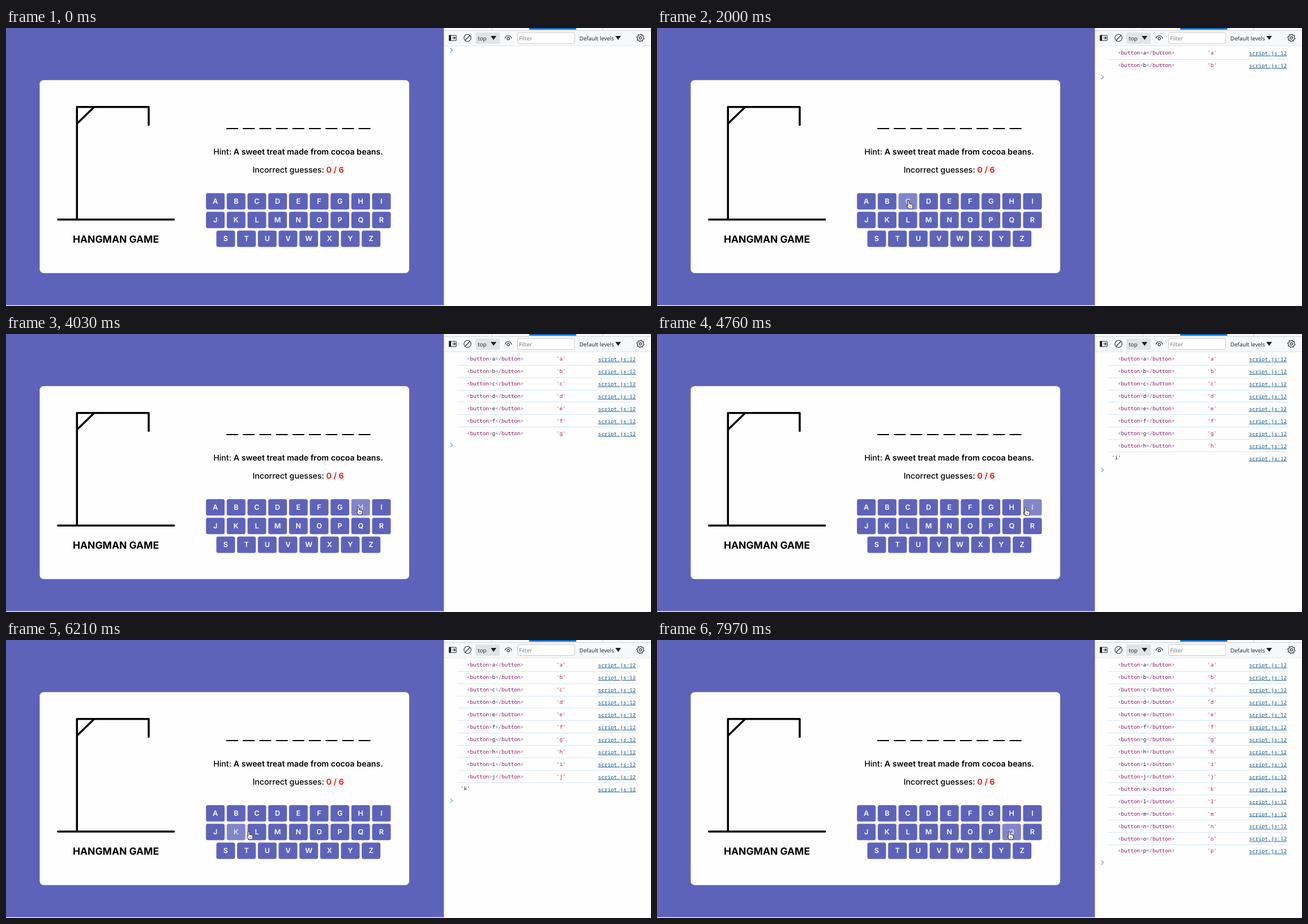
These frames come from a looping animation (1139 by 492 pixels, 8000 ms). An HTML page:

```html
<!DOCTYPE html>
<html lang="en">
<head>
<meta charset="utf-8">
<title>Hangman</title>
<style>
  html, body { margin: 0; width: 100%; height: 100%; overflow: hidden; background: #fff; }
  svg { display: block; width: 100vw; height: 100vh; text-rendering: geometricPrecision; }
  text { white-space: pre; }
  .game { font-family: Inter, sans-serif; font-size: 14.2px; font-weight: 500; text-anchor: middle; }
  .bold { font-weight: 600; }
  .red { font-weight: 600; fill: #f00c00; }
  .title { font-size: 17.5px; font-weight: 700; }
  .key rect { fill: #5e63ba; }
  .key text { fill: #fff; font-size: 12.6px; font-weight: 600; }
  .key.hover rect { fill: #8286c9; }
  .key.hover text { fill-opacity: .75; }
  .gallows { fill: none; stroke: #000; stroke-width: 3.5; stroke-linecap: round; stroke-linejoin: round; }
  .ui { font: 9.8px "Open Sans", sans-serif; fill: #1f1f1f; }
  .icon { fill: none; stroke: #2b2b2b; stroke-width: 1.1; }
  .log { font: 9.25px "Noto Sans Mono", monospace; fill: #222; }
  .tag { fill: #881260; }
  .mark { fill: #855c9c; }
  .str { fill: #a3244f; }
  .link { fill: #0f548c; text-decoration: underline; }
</style>
</head>
<body>
<svg viewBox="0 0 1139 492" preserveAspectRatio="none">
  <rect width="773" height="490.7" fill="#5e63ba"/>
  <rect x="59.5" y="92.2" width="652.5" height="341.5" rx="7" fill="#fefefe"/>
  <path class="gallows" d="M91.8 339H296.7M125.3 339V139.8H252V171.5M126 168.8L155 140.5"/>
  <path id="blanks" stroke="#000" stroke-width="2"/>
  <g class="game">
    <text class="title" x="194" y="380.3">HANGMAN GAME</text>
    <text x="516" y="224.3">Hint: <tspan class="bold">A sweet treat made from cocoa beans.</tspan></text>
    <text x="516" y="256.3">Incorrect guesses: <tspan class="red">0 / 6</tspan></text>
    <g id="keys"></g>
  </g>

  <rect x="773" width="366" height="492" fill="#fefefe"/>
  <rect x="773" width="366" height="31" fill="#f7f8f9"/>
  <path d="M773.5 0V492M857.5 0V4M1053.5 0V4M773 4.5H1139" stroke="#d2d4d8" fill="none"/>
  <path d="M774 31.5H1139" stroke="#dfe7f4"/>
  <rect x="924" width="83" height="3" fill="#146ecd"/>
  <g class="ui">
    <rect x="829" y="8" width="43" height="20" rx="2" fill="#e2e3e4"/>
    <rect x="903.5" y="8" width="100.5" height="19.5" rx="3" fill="#fff" stroke="#c8c8c8"/>
    <text x="833" y="21.5">top</text>
    <text x="906" y="21.5" fill="#757575">Filter</text>
    <text x="1012.5" y="21.5">Default levels</text>
    <path d="M856 14h10l-5 7zM1076 14h10l-5 7z"/>
    <path d="M782 12.5h4v10h-4z"/>
    <path class="icon" d="M788 17.5h5M790.7 15l2.6 2.5-2.6 2.5"/>
    <rect class="icon" x="782.5" y="13" width="12.5" height="9.3" rx="1"/>
    <circle class="icon" cx="815" cy="17.5" r="6.3"/>
    <path class="icon" d="M810.6 22L819.4 13"/>
    <path class="icon" d="M881 18.5q1.5-4.7 6-4.7t6 4.7"/>
    <circle class="icon" cx="887" cy="18.7" r="2.2"/>
    <circle class="icon" cx="1120.3" cy="17.5" r="2.1"/>
    <path id="gear" class="icon" stroke-linejoin="round"/>
  </g>
  <g id="rows" class="log"></g>
  <path id="prompt" d="M-2-3.7L2 0L-2 3.7" fill="none" stroke="#6c9ce6" stroke-width="1.2"/>

  <g id="cursor" stroke="#111" stroke-width=".9" stroke-linejoin="round" fill="#fff">
    <g id="hand">
      <path d="M-1.3 .8a1.3 1.3 0 0 1 2.6 0V4.8l4.6 1.1q1.6 .4 1.5 2l-.5 3.2q-.2 1.4-.9 2.6H.3q-1-1.8-3-4.5-1-1.4 0-1.9 .8-.4 1.4 .9z"/>
      <path d="M2.2 8.5v3M4.2 8.5v3" stroke-width=".6"/>
    </g>
    <path id="arrow" d="M0 0V10.8l2.4-2.1 1.7 3.9 1.7-.7-1.7-3.8H7.3z"/>
  </g>
</svg>
<script>
  const LOOP = 8000, ENTER = 110;
  const ROW = 21.95;             // console row height
  const RAW = 110;               // a new row shows plain text this long
  const LAG = 40;                // hover trails the pointer
  const KEY_W = 33, KEY_H = 29;
  const $ = id => document.getElementById(id);
  const range = n => [...Array(n).keys()];
  const letters = 'abcdefghijklmnopqrstuvwxyz';

  $('blanks').setAttribute('d', range(9).map(i => `M${389 + i * 29.2} 178h21`).join(''));

  // The radius alternates between teeth and valleys
  $('gear').setAttribute('d', 'M' + range(32).map(i => {
    const a = (i + .5) * Math.PI / 16, r = i % 4 < 2 ? 6.6 : 5;
    return `${1120.3 + r * Math.cos(a)} ${17.5 + r * Math.sin(a)}`;
  }).join('L') + 'z');

  // Three lines of up to nine keys, the short one centred
  const keys = [...letters].map((c, i) => {
    const line = Math.floor(i / 9), count = Math.min(9, 26 - line * 9);
    return { c, x: 516.3 - KEY_W / 2 + (i % 9 - (count - 1) / 2) * 36.67, y: 292.3 + line * 33.05 };
  });
  $('keys').innerHTML = keys.map(k => `<g class="key">
    <rect x="${k.x}" y="${k.y}" width="${KEY_W}" height="${KEY_H}" rx="3.5"/>
    <text x="${k.x + KEY_W / 2}" y="${k.y + 19}">${k.c.toUpperCase()}</text></g>`).join('');
  const keyEls = [...$('keys').children];

  // Letters are clicked in order, in bursts of even or quickening pace
  const burst = (start, count, pace, quicken = 0) =>
    range(count).map(k => start + pace * k - quicken * k * k);
  const clicks = [...burst(840, 1, 0), ...burst(1670, 8, 436), ...burst(5690, 7, 440, 20)];

  const tag = s => `<tspan class="mark">&lt;${s}</tspan><tspan class="tag">button</tspan><tspan class="mark">&gt;</tspan>`;
  $('rows').innerHTML = clicks.map((_, i) => {
    const c = letters[i], y = 47.2 + i * ROW;
    const rule = i ? `<rect x="797" y="${Math.floor(55.1 + (i - 1) * ROW)}" width="318" height="1" fill="#d8e5f8"/>` : '';
    return `<g>${rule}
      <text class="raw" x="803" y="${y - .8}">'${c}'</text>
      <g class="full"><text x="814" y="${y}">${tag('')}${c}${tag('/')}</text>
      <text class="str" x="972" y="${y}">'${c}'</text></g>
      <text class="link" x="1045.5" y="${y + .9}">script.js:12</text></g>`;
  }).join('');
  const rows = [...$('rows').children].map(el => ({
    el, raw: el.querySelector('.raw'), full: el.querySelector('.full')
  }));

  // After each click the pointer glides to the next key
  const aim = i => [keys[i].x + 18, keys[i].y + 14];
  const legs = [
    { t0: ENTER, t1: 660, from: [1052, 485], to: aim(0), lift: 110 },
    ...clicks.map((t, i) => {
      const next = clicks[i + 1] ?? LOOP + 500;
      return { t0: t + 25, t1: t + .65 * (next - t), from: aim(i), to: aim(i + 1), lift: 0 };
    })
  ];

  function pointer(t) {
    const leg = legs.filter(l => t >= l.t0).pop() ?? legs[0];
    const p = Math.min(1, Math.max(0, (t - leg.t0) / (leg.t1 - leg.t0)));
    const s = 1 - (1 - p) ** 2;
    const [x, y] = leg.from.map((a, i) => a + (leg.to[i] - a) * s);
    return [x, y - leg.lift * Math.sin(Math.PI * s)];
  }

  const keyAt = ([x, y]) => keys.findIndex(k =>
    x >= k.x && x <= k.x + KEY_W && y >= k.y && y <= k.y + KEY_H);
  const show = (el, on) => { el.style.display = on ? '' : 'none'; };
  const place = (el, x, y) => el.setAttribute('transform', `translate(${x} ${y})`);

  function draw(t) {
    const count = clicks.filter(c => t >= c).length;
    rows.forEach((row, i) => {
      const raw = t < clicks[i] + RAW;
      show(row.el, i < count);
      show(row.raw, raw);
      show(row.full, !raw);
    });
    place($('prompt'), 786.5, count ? 42.9 + count * ROW : 39.5);

    const [x, y] = pointer(t), over = keyAt([x, y]) >= 0;
    const hot = keyAt(pointer(t - LAG));
    keyEls.forEach((el, i) => el.classList.toggle('hover', i === hot));
    show($('cursor'), t >= ENTER);
    show($('hand'), over);
    show($('arrow'), !over);
    place($('cursor'), x, y);
  }

  const begin = performance.now();
  function tick() {
    draw((performance.now() - begin) % LOOP);
    requestAnimationFrame(tick);
  }
  draw(0);
  requestAnimationFrame(tick);
</script>
</body>
</html>
```
